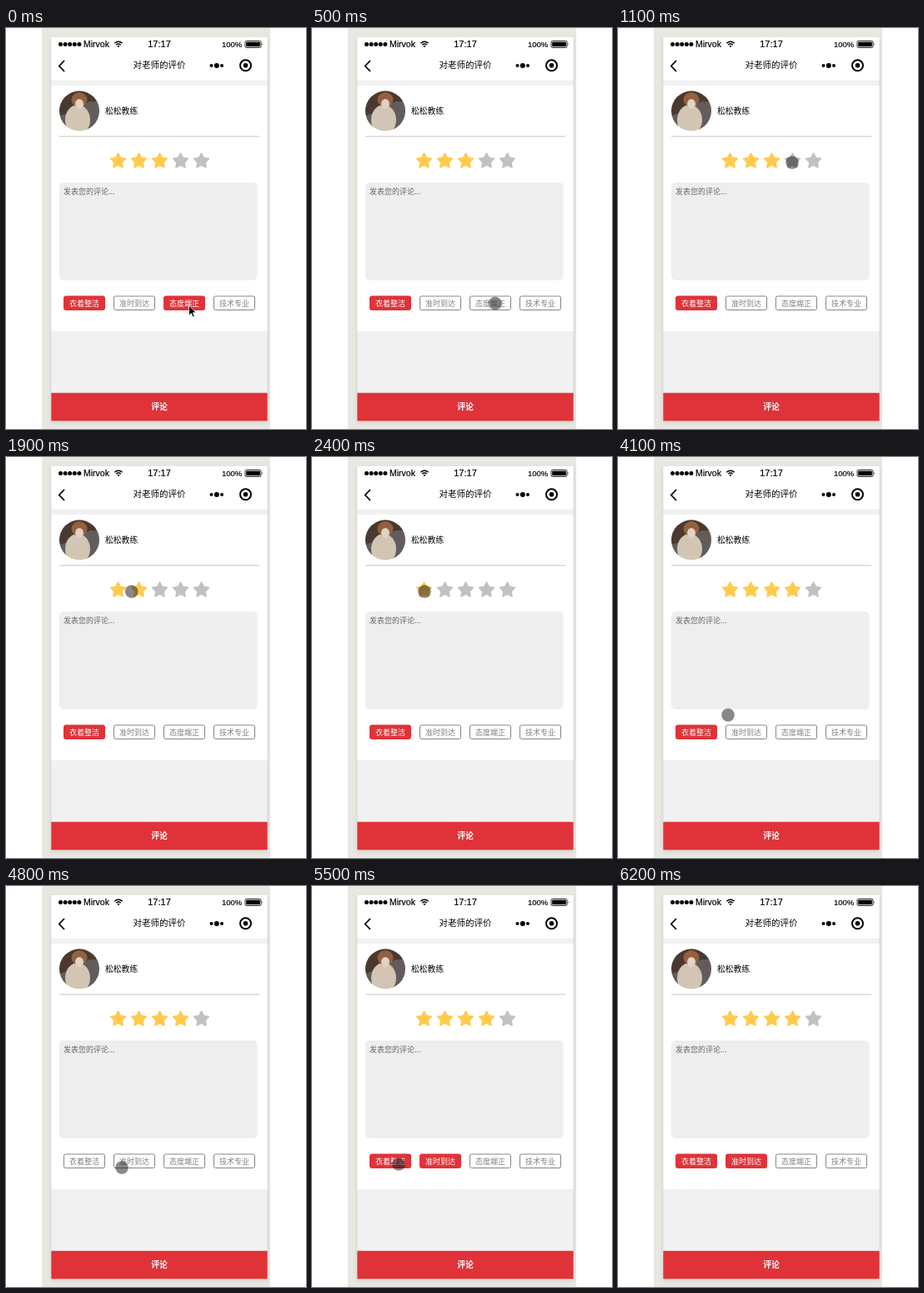
Recreate the animation shown at these times as an HTML page. Size 360x480 px, loop 6300 ms.

```html
<!DOCTYPE html>
<html lang="zh-CN">
<head>
<meta charset="utf-8">
<style>
  html, body { margin: 0; width: 100%; height: 100%; overflow: hidden; background: #fff; }
  svg { display: block; }
  text { font-family: "Noto Sans CJK SC", "Noto Sans CJK", sans-serif; font-weight: 500; }
  .latin text { font-family: "Liberation Sans", Arial, sans-serif; font-weight: 400; stroke: #000; stroke-width: .2; }
  .mid { text-anchor: middle; }
  .star { fill: #c1c1c1; stroke: #c1c1c1; stroke-width: 1.8; stroke-linejoin: round; }
  .star.on { fill: #ffcb4f; stroke: #ffcb4f; }
  .tag rect { fill: #fff; stroke: #858585; }
  .tag text { fill: #808080; font-size: 9px; font-weight: 400; }
  .tag.on rect { fill: #df3339; stroke: #df3339; }
  .tag.on text { fill: #fff; font-weight: 500; }
</style>
</head>
<body>
<svg width="360" height="480" viewBox="0 0 360 480">
  <defs>
    <clipPath id="round"><circle cx="88" cy="99.3" r="24"/></clipPath>
    <filter id="shadow"><feGaussianBlur stdDeviation="2.5"/></filter>
    <filter id="soft"><feGaussianBlur stdDeviation=".7"/></filter>
    <clipPath id="backdrop"><path d="M43 0H317V480H43z"/></clipPath>
  </defs>
  <g clip-path="url(#backdrop)">
    <path fill="#e9e7e2" d="M43 0H317V480H43z"/>
    <path fill="#b9b7b2" opacity=".5" filter="url(#shadow)" d="M54 13H314V472H54z"/>
  </g>
  <path fill="#f1f1f1" d="M54.5 11H313.5V470H54.5z"/>
  <path fill="#fff" d="M54.5 11H313.5V62.5H54.5zM54.5 69H313.5V363H54.5z"/>
  <path fill="#df3339" d="M54.3 436.7H313.7V470.2H54.3z"/>

  <!-- status bar -->
  <path stroke="#000" stroke-width="5" stroke-linecap="round" stroke-dasharray="0 5.6" d="M65.5 19.5H88.2"/>
  <g class="latin" font-size="10.5">
    <text x="93" y="22.5">Mirvok</text>
    <text class="mid" x="184" y="22.5" font-size="11">17:17</text>
    <text x="259" y="22.5" font-size="9.5">100%</text>
  </g>
  <g fill="none" stroke="#000" stroke-width="1.4">
    <path d="M130.3 18.2Q135 14.2 139.7 18.2M132.2 20.2Q135 17.9 137.8 20.2"/>
    <path fill="#000" stroke="none" d="M133.4 21.5Q135 20.3 136.6 21.5L135 23.2z"/>
    <rect x="287" y="15.5" width="19" height="8" rx="1.5" stroke-width=".8"/>
    <path fill="#000" stroke="none" d="M288.2 16.7H304.8V22.3H288.2zM306.8 18Q308.6 19.5 306.8 21z"/>
  </g>

  <!-- title bar -->
  <path fill="none" stroke="#000" stroke-width="1.8" d="M70 39L63.8 45.5L70 52"/>
  <text class="mid" x="184" y="48.3" font-size="10.5">对老师的评价</text>
  <circle cx="246.5" cy="45" r="2"/><circle cx="252.8" cy="45" r="3"/><circle cx="259" cy="45" r="2"/>
  <circle cx="287.5" cy="44.8" r="6.5" fill="none" stroke="#000" stroke-width="2"/>
  <circle cx="287.5" cy="44.8" r="2.8"/>

  <!-- coach -->
  <g clip-path="url(#round)">
    <g filter="url(#soft)">
      <path fill="#625c5b" d="M60 70H116V128H60z"/>
      <path fill="#4a3930" d="M60 70H116V88H100L80 100L60 106z"/>
      <ellipse cx="86" cy="110" rx="15" ry="18" fill="#d3c5b3"/>
      <ellipse cx="88" cy="86" rx="9.5" ry="9" fill="#94603f"/>
      <ellipse cx="88" cy="91" rx="5" ry="6" fill="#e0d2c4"/>
    </g>
  </g>
  <text x="119" y="103.2" font-size="9.8">松松教练</text>
  <path fill="#d9d9d9" d="M64 129H304V130.6H64z"/>

  <g id="stars"></g>
  <rect x="64" y="185" width="237.5" height="117" rx="5" fill="#eee"/>
  <text x="69" y="198.5" font-size="9" fill="#666">发表您的评论...</text>
  <g id="tags"></g>
  <text class="mid" x="184" y="457.2" font-size="9.8" style="font-weight: 700" fill="#fff">评论</text>

  <circle id="dot" r="7.8" fill="#111" fill-opacity=".5"/>
  <path id="arrow" stroke="#fff" stroke-width=".8" d="M219.5 332V344.2L222.3 341.6L224.3 346L226.3 345.1L224.4 340.8H228.2z"/>
</svg>
<script>
const LOOP = 6300, STEP = 100, REST = 150;
const STAR = { x: 134.5, y: 159.3, gap: 25 }, TAG = { x: 69, y: 320, gap: 60 };
const $ = id => document.getElementById(id);

// Taps as [time, x, y]; the place decides which star or tag is hit.
const taps = [
  [300, 220, 333], [1200, 209, 161], [1600, 158, 161], [2300, 135, 161], [2900, 235, 160],
  [3450, 209, 161], [4400, 120, 332], [4900, 139, 337], [5500, 104, 333], [LOOP, 120, 492]
];

const starPoints = Array.from({ length: 10 }, (_, i) => {
  const r = i % 2 ? 4.7 : 9.2, a = i * Math.PI / 5;
  return [r * Math.sin(a), -r * Math.cos(a)].map(v => v.toFixed(2));
}).join(' ');

$('stars').innerHTML = [0, 1, 2, 3, 4].map(i =>
  `<polygon class="star" points="${starPoints}" transform="translate(${STAR.x + STAR.gap * i} ${STAR.y})"/>`).join('');
$('tags').innerHTML = ['衣着整洁', '准时到达', '态度端正', '技术专业'].map((label, i) =>
  `<g class="tag" transform="translate(${TAG.x + TAG.gap * i} ${TAG.y})">
    <rect x=".5" y="1" width="49" height="16.5" rx="2"/><text class="mid" x="25" y="12.7">${label}</text>
  </g>`).join('');

// Replay every tap up to time t.
function stateAt(t) {
  let stars = 3;
  const tags = [true, false, true, false];
  for (const [time, x, y] of taps) {
    if (time > t) break;
    if (y < 250) {
      stars = Math.round((x - STAR.x) / STAR.gap) + 1;
    } else {
      const i = Math.floor((x - TAG.x) / TAG.gap);
      tags[i] = !tags[i];
    }
  }
  return { stars, tags };
}

// The finger rests around each tap and eases on to the next.
function fingerAt(t) {
  const next = taps.findIndex(([time]) => time > t);
  const [t1, x1, y1] = taps[next], [t0, x0, y0] = taps[Math.max(next - 1, 0)];
  const k = Math.min(1, Math.max(0, (t - t0 - REST) / (t1 - t0 - 2 * REST || 1)));
  const e = k * k * (3 - 2 * k);
  return [x0 + (x1 - x0) * e, y0 + (y1 - y0) * e];
}

function draw(now) {
  const t = Math.floor(now % LOOP / STEP) * STEP;
  const { stars, tags } = stateAt(t), [x, y] = fingerAt(t);
  [...$('stars').children].forEach((s, i) => s.classList.toggle('on', i < stars));
  [...$('tags').children].forEach((g, i) => g.classList.toggle('on', tags[i]));
  const pointer = t < 200;
  $('arrow').style.display = pointer ? '' : 'none';
  $('dot').style.display = pointer ? 'none' : '';
  $('dot').setAttribute('transform', `translate(${x} ${y})`);
}

let start;
function tick(now) {
  start ??= now;
  draw(now - start);
  requestAnimationFrame(tick);
}
draw(0);
requestAnimationFrame(tick);
</script>
</body>
</html>
```
